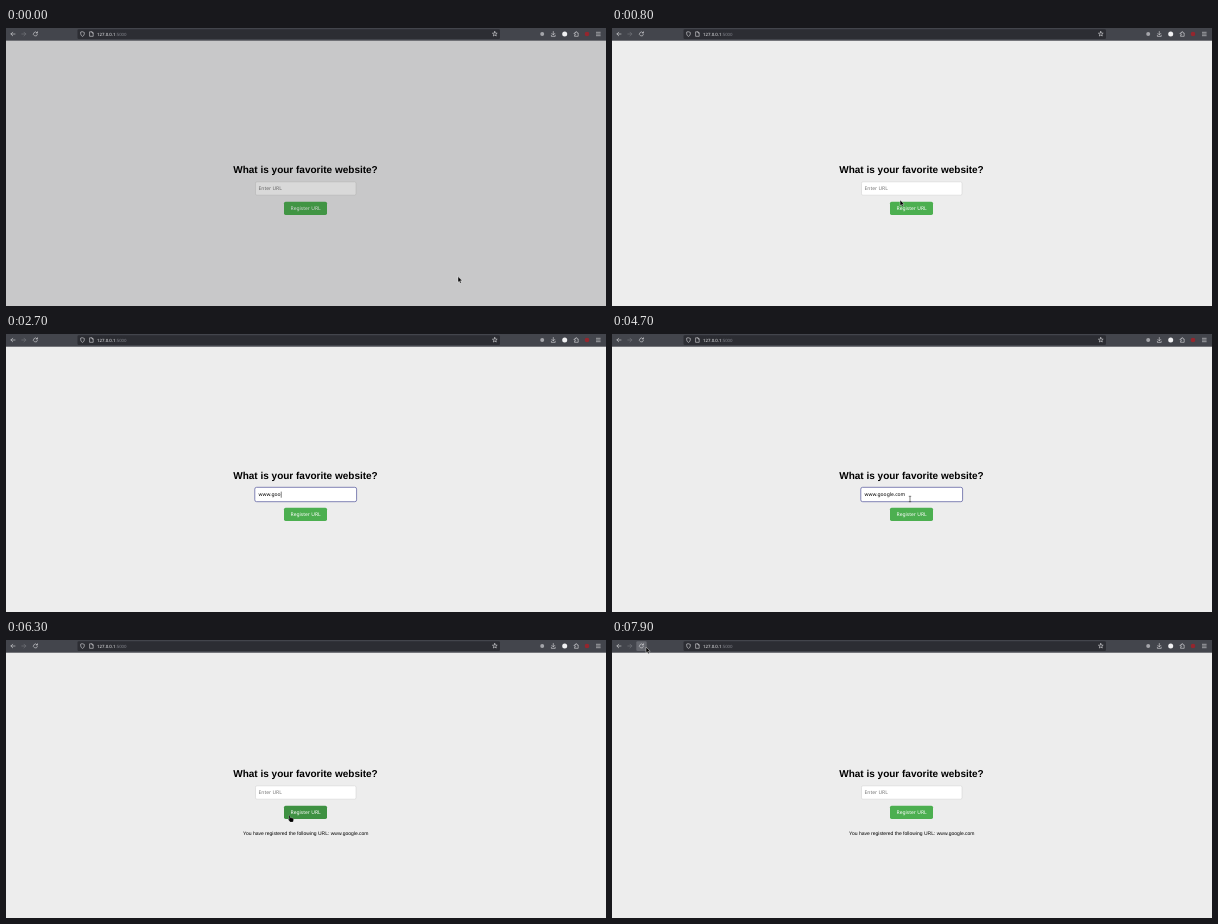
Write an HTML page that moves like this. It is 600 px wide and 278 px high and loops after 8 s.

```html
<!DOCTYPE html>
<html lang="en">
<head>
<meta charset="utf-8">
<title>Favorite website form</title>
<style>
  html, body { margin: 0; width: 100%; height: 100%; overflow: hidden; }
  svg { display: block; width: 100vw; height: 100vh; }
  text { font: 5px "Noto Sans", "Open Sans", sans-serif; text-rendering: geometricPrecision; white-space: pre; }
  .page { font-family: "Liberation Sans", Arial, sans-serif; text-anchor: middle; }
  .icon { fill: none; stroke: #d8d8dc; stroke-width: .6; stroke-linecap: round; stroke-linejoin: round; }
</style>
</head>
<body>
<svg viewBox="0 0 600 278">
  <rect id="back" width="600" height="278"/>

  <g id="form">
    <text class="page" x="299.5" y="145" style="font-size:10px;font-weight:bold">What is your favorite website?</text>
    <rect x="249.5" y="153.8" width="100.5" height="13.4" rx="1.4" fill="#fff" stroke="#ccc" stroke-width=".5"/>
    <rect id="ring" x="248.8" y="153.3" width="101.8" height="14.4" rx="1.8" fill="#fff" stroke="#50529a" stroke-width=".7"/>
    <text id="entry" x="252.6" y="162.3"></text>
    <rect id="caret" y="157.6" width=".5" height="6.1"/>
    <rect id="button" x="278" y="173.7" width="43" height="13.2" rx="1.6"/>
    <text x="299.6" y="182.1" fill="#fff" text-anchor="middle">Register URL</text>
    <text id="result" class="page" x="299.8" y="202.6">You have registered the following URL: www.google.com</text>
  </g>
  <rect id="shade" y="12.5" width="600" height="266" fill="#000" opacity=".15"/>

  <rect width="600" height="12.7" fill="#43454c"/>
  <rect x="71.5" y="1.2" width="422.5" height="9.8" rx="1.3" fill="#2c2d33"/>
  <rect id="reload" x="24.3" y="1.2" width="10.4" height="9.8" rx="1.3" fill="#65676e"/>
  <text x="91" y="7.7" fill="#f4f4f6" style="font-size:4.375px">127.0.0.1<tspan fill="#85868e">:5000</tspan></text>
  <g class="icon">
    <path d="M9 6H5M6.7 4.2L4.9 6L6.7 7.8"/>
    <path d="M15.8 6H19.8M18 4.2L19.8 6L18 7.8" stroke="#797b82"/>
    <path d="M31 4.7A2 2 0 1 0 31.4 6.5M31.5 3.8V5H30.3"/>
    <path d="M76.5 3.8L78.3 4.4V6Q78.1 7.7 76.5 8.4Q74.9 7.7 74.7 6V4.4Z"/>
    <path d="M84 3.8H86L87.2 5V8.3H84ZM86 3.9V5H87.1"/>
    <path id="star"/>
    <path d="M547.3 3.5V6.8M545.8 5.4L547.3 6.9L548.8 5.4M545.4 7.2V8.4H549.2V7.2"/>
    <path d="M568.5 5H569.5Q569.3 3.6 570.3 3.6T571.1 5H572.2V8.3H568.5V7.4Q569.6 7.3 569.6 6.7T568.5 6Z"/>
    <path d="M590.4 4.3H594.2M590.4 6H594.2M590.4 7.7H594.2"/>
  </g>
  <circle cx="536.2" cy="5.9" r="2" fill="#a4a5aa"/>
  <circle cx="558.7" cy="6" r="2.5" fill="#f0f0f2"/>
  <circle cx="581" cy="6" r="2.3" fill="#94262e"/>

  <g id="pointer">
    <path id="arrow" d="M0 0V5.8L1.3 4.7L2.2 6.8L3.3 6.3L2.4 4.3L4.2 4.2Z" stroke="#fff" stroke-width=".4"/>
    <path id="beam" d="M0 -2.7V2.7M-1.2 -2.7H1.2M-1.2 2.7H1.2" fill="none" stroke="#333" stroke-width=".6"/>
    <path id="hand" d="M-.9 .2Q-.2 -.7 .4 .3L.7 2L3.6 2.7Q4.5 3.1 4 4.8L3.5 6.6H.7L-1.2 4.2Q-1.4 3.2 -.2 3.7Z" stroke="#fff" stroke-width=".25"/>
  </g>
</svg>
<script>
const el = Object.fromEntries([...document.querySelectorAll('[id]')].map(e => [e.id, e]));
const show = (name, on) => el[name].setAttribute('visibility', on ? 'visible' : 'hidden');
const set = (name, key, value) => el[name].setAttribute(key, value);

const LOOP = 8000, STEP = 100, FOCUS = 900, SUBMIT = 5500;
const KEY_GAP = 125, TYPE_START = 1800, TYPE_END = 4000;
const bursts = [[TYPE_START, 'www.'], [2400, 'goog'], [3200, 'le.'], [3700, 'com']];

// pointer moves: start, end, x, y
const moves = [
  [100, 400, 418, 231], [500, 900, 264, 161], [1000, 1300, 298, 165],
  [3800, 3900, 339, 175], [4600, 4700, 298, 165], [4800, 5400, 283.5, 175.5],
  [6300, 7500, 31, 6], [7600, 7900, 34, 7]
];

function pointerAt(t) {
  let x = 452, y = 248.5;
  for (const [start, end, toX, toY] of moves) {
    const k = Math.min(1, Math.max(0, (t - start) / (end - start)));
    const ease = k * k * (3 - 2 * k);
    x += (toX - x) * ease;
    y += (toY - y) * ease;
  }
  return [x, y];
}

const typedAt = t => bursts.map(([start, part]) =>
  part.slice(0, Math.max(0, Math.floor((t - start) / KEY_GAP) + 1))).join('');

const star = Array.from({ length: 10 }, (_, i) => {
  const r = i % 2 ? 1.1 : 2.5, a = i * Math.PI / 5;
  return `${488.8 + r * Math.sin(a)} ${6 - r * Math.cos(a)}`;
});
set('star', 'd', `M${star.join('L')}Z`);

function draw(now) {
  const t = Math.floor(now % LOOP / STEP) * STEP;
  const sent = t >= SUBMIT, lift = sent ? -8 : 0;
  const typed = sent ? '' : typedAt(t);

  set('back', 'fill', t < 400 ? '#ebebec' : '#ededed');
  show('shade', t < STEP);
  set('form', 'transform', `translate(0 ${lift})`);
  show('result', sent);
  show('ring', t >= FOCUS && !sent);

  el.entry.textContent = typed || 'Enter URL';
  set('entry', 'fill', typed ? '#000' : '#777');
  show('caret', typed && t <= TYPE_END);
  set('caret', 'x', 252.8 + el.entry.getComputedTextLength());

  const [x, y] = pointerAt(t);
  const within = (left, top, right, bottom) => x > left && x < right && y > top && y < bottom;
  const onButton = within(278, 173.7 + lift, 321, 187 + lift);
  const onField = within(249, 153.5 + lift, 350, 167.5 + lift);
  set('button', 'fill', onButton ? '#3e9142' : '#4caf50');
  show('reload', within(24, 0, 35, 12));

  const visible = t < TYPE_START || t >= TYPE_END;
  set('pointer', 'transform', `translate(${x} ${y})`);
  show('hand', visible && onButton);
  show('beam', visible && onField);
  show('arrow', visible && !onButton && !onField);
}

function tick() {
  draw(performance.now());
  requestAnimationFrame(tick);
}
tick();
</script>
</body>
</html>
```
